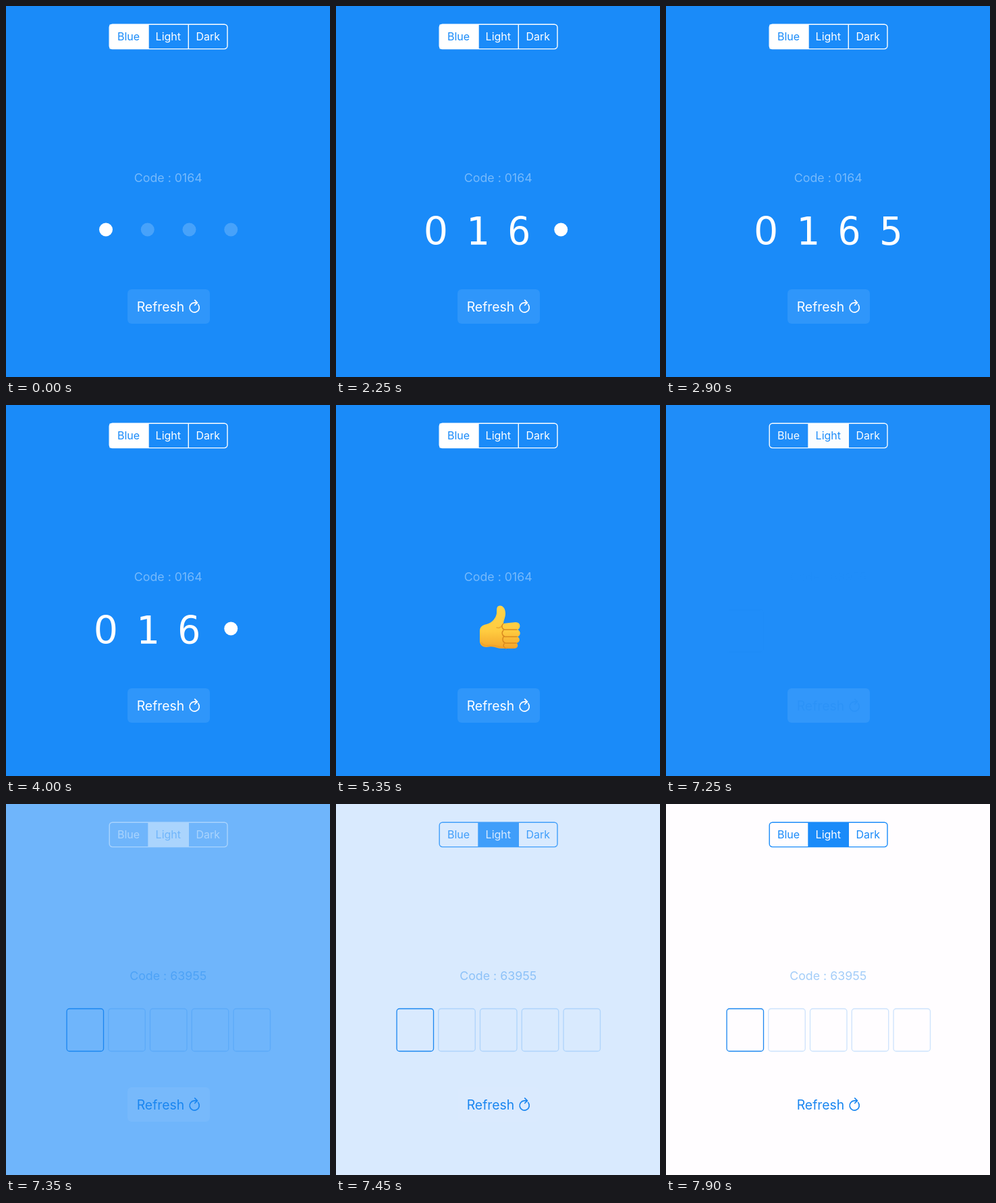
An HTML page for the animation above (8 s loop, 480 px wide and 550 px high).

```html
<!DOCTYPE html>
<html lang="en">
<head>
<meta charset="utf-8">
<title>Pin code field</title>
<style>
  html, body { margin: 0; width: 100%; height: 100%; overflow: hidden; background: #1a8bf9; }
  svg { display: block; width: 480px; height: 550px; font-family: Inter, Roboto, sans-serif; }
  text { text-anchor: middle; }
  .digit { font: 57px "DejaVu Sans Mono", monospace; fill: #fff; }
  .zero { font-family: "DejaVu Sans", sans-serif; }
</style>
</head>
<body>
<svg viewBox="0 0 480 550">
  <defs>
    <linearGradient id="skin" x1="0" y1="0" x2="0" y2="1">
      <stop offset="0" stop-color="#ffd54c"/>
      <stop offset=".6" stop-color="#ffcb3f"/>
      <stop offset="1" stop-color="#f3a52c"/>
    </linearGradient>
  </defs>
  <rect id="bg" width="480" height="550"/>

  <g id="tabs" font-size="16">
    <rect id="pick" y="27.5" height="36"/>
    <rect id="frame" x="153.2" y="27.2" width="174.8" height="36.4" rx="4.5" fill="none" stroke-width="1.4"/>
    <path id="split" d="M211 27V64M270.3 27V64" stroke-width="1.4"/>
    <text x="181.5" y="51">Blue</text>
    <text x="240.3" y="51">Light</text>
    <text x="299.3" y="51">Dark</text>
  </g>

  <text id="code" x="240.3" y="261" font-size="17.8"></text>
  <g id="pins"></g>
  <g id="boxes" fill="none" stroke="#1a86f0" stroke-width="1.3"></g>

  <g id="thumb">
    <path fill="url(#skin)" d="M213 335C213 329 217 326 223 325C231 323 237 316 238 309C238.500 304 237 298 242.500 297.500C248 297 251 303 251 309C251 315 248 320 248 324L266 322C274 322 274 331 269 333C274 335 274 342 269 343.500C273.500 346 272.500 352 267.500 353C271 356 269 361 264 361L246 361C239 361 234 357 227 358.500C220 360 214 358 213 351Z"/>
    <g fill="none" stroke="#d98a1f" stroke-width="1.5" stroke-linecap="round">
      <path d="M248 324C245 326 245 332 250 333H268M248 334C245 337 246 342 250 343.500H268M248 344C246 347 247 352 251 353H267M249 354C247 357 249 360 252 361"/>
      <path d="M238 330C241 331 244 330 246 327" opacity=".55"/>
    </g>
    <path d="M215 352C220 360 229 355 236 357C242 359 251 361 264 360" fill="none" stroke="#e99a28" stroke-width="2" opacity=".55"/>
  </g>

  <rect id="button" x="180" y="420" width="122" height="51" rx="6" fill="#fff"/>
  <g id="refresh">
    <text x="229" y="453" font-size="19.4">Refresh</text>
    <path d="M284.700 442.500A7.100 7.100 0 1 1 279 439.900H283M279.700 436.200L283.500 439.900L279.700 443.500" fill="none" stroke-width="1.7" stroke-linecap="round" stroke-linejoin="round"/>
  </g>
</svg>
<script>
  const LOOP = 8000, STEP = 61.75;
  const BLUE = [26, 139, 249], WHITE = [255, 255, 255], PAPER = [255, 253, 255];
  const SHAKE = [0, -14, 14, -14, 14, -8, 8, -4, 4, 0];
  // Moments at which the typed code changes
  const TYPED = [[0, ""], [950, "0"], [1400, "01"], [2250, "016"], [2350, "0165"], [3400, "016"], [4150, "0164"]];

  const $ = id => document.getElementById(id);
  const set = (el, attrs) => { for (const k in attrs) el.setAttribute(k, attrs[k]); };
  const add = (parent, tag, attrs) => {
    const el = document.createElementNS("http://www.w3.org/2000/svg", tag);
    set(el, attrs);
    return parent.appendChild(el);
  };
  const part = (t, from, to) => Math.min(1, Math.max(0, (t - from) / (to - from)));
  const ease = p => p * p * (3 - 2 * p);
  const mix = (a, b, p) => `rgb(${a.map((v, i) => Math.round(v + (b[i] - v) * p))})`;

  const pins = [0, 1, 2, 3].map(i => ({
    dot: add($("pins"), "circle", { cx: 148 + i * STEP, cy: 331.5, r: 10, fill: "#fff" }),
    digit: add($("pins"), "text", { x: 148 + i * STEP, y: 353.5, class: "digit" })
  }));
  for (let i = 0; i < 5; i++) {
    add($("boxes"), "rect", { x: 90 + i * STEP, y: 303.5, width: 54.5, height: 63, rx: 4, "stroke-opacity": i ? 0.22 : 1 });
  }
  const labels = [...$("tabs").querySelectorAll("text")];

  function shakeAt(t) {
    const p = part(t, 2400, 3000) * (SHAKE.length - 1);
    const i = Math.min(Math.floor(p), SHAKE.length - 2);
    return SHAKE[i] + (SHAKE[i + 1] - SHAKE[i]) * (p - i);
  }

  function drawPins(t) {
    const typed = TYPED.filter(s => s[0] <= t).pop()[1];
    pins.forEach(({ dot, digit }, i) => {
      const ch = typed[i] || "";
      digit.textContent = ch;
      digit.classList.toggle("zero", ch === "0");
      set(dot, { opacity: ch ? 0 : i === typed.length ? 1 : 0.2 });
    });
    set($("pins"), { transform: `translate(${shakeAt(t)})`, opacity: 1 - ease(part(t, 4500, 4700)) });
  }

  function drawTabs(light, tint, bg) {
    const active = light ? 1 : 0;
    set($("pick"), { x: light ? 211 : 153.5, width: light ? 59.3 : 57.5, fill: tint });
    set($("frame"), { stroke: tint });
    set($("split"), { stroke: tint });
    labels.forEach((el, i) => set(el, { fill: i === active ? bg : tint }));
  }

  function draw(t) {
    const p = ease(part(t, 7225, 7530));
    const bg = mix(BLUE, PAPER, p);
    const out = 1 - ease(part(t, 7050, 7220));
    const back = part(t, 7250, 7350);
    const light = t >= 7225;
    const ink = light ? "#1a86f0" : "#fff";

    set($("bg"), { fill: bg });
    drawTabs(t >= 7050, mix(WHITE, BLUE, p), bg);
    drawPins(t);

    $("code").textContent = light ? "Code : 63955" : "Code : 0164";
    set($("code"), { fill: ink, opacity: light ? 0.4 * back : 0.4 * out });
    set($("boxes"), { opacity: back });

    const pop = ease(part(t, 4700, 5000));
    const size = 0.6 + 0.4 * pop;
    set($("thumb"), {
      opacity: pop * out,
      transform: `translate(242 329) scale(${size}) translate(-242 -329)`
    });

    set($("button"), { opacity: 0.09 * (1 - p) });
    const word = light ? 0.25 + 0.75 * back : 1 - 0.75 * part(t, 7050, 7225);
    set($("refresh"), { fill: ink, stroke: "none", opacity: word });
    set($("refresh").lastElementChild, { stroke: ink });
  }

  const start = performance.now();
  function tick(now) {
    draw(Math.max(0, now - start) % LOOP);
    requestAnimationFrame(tick);
  }
  draw(0);
  requestAnimationFrame(tick);
</script>
</body>
</html>
```
